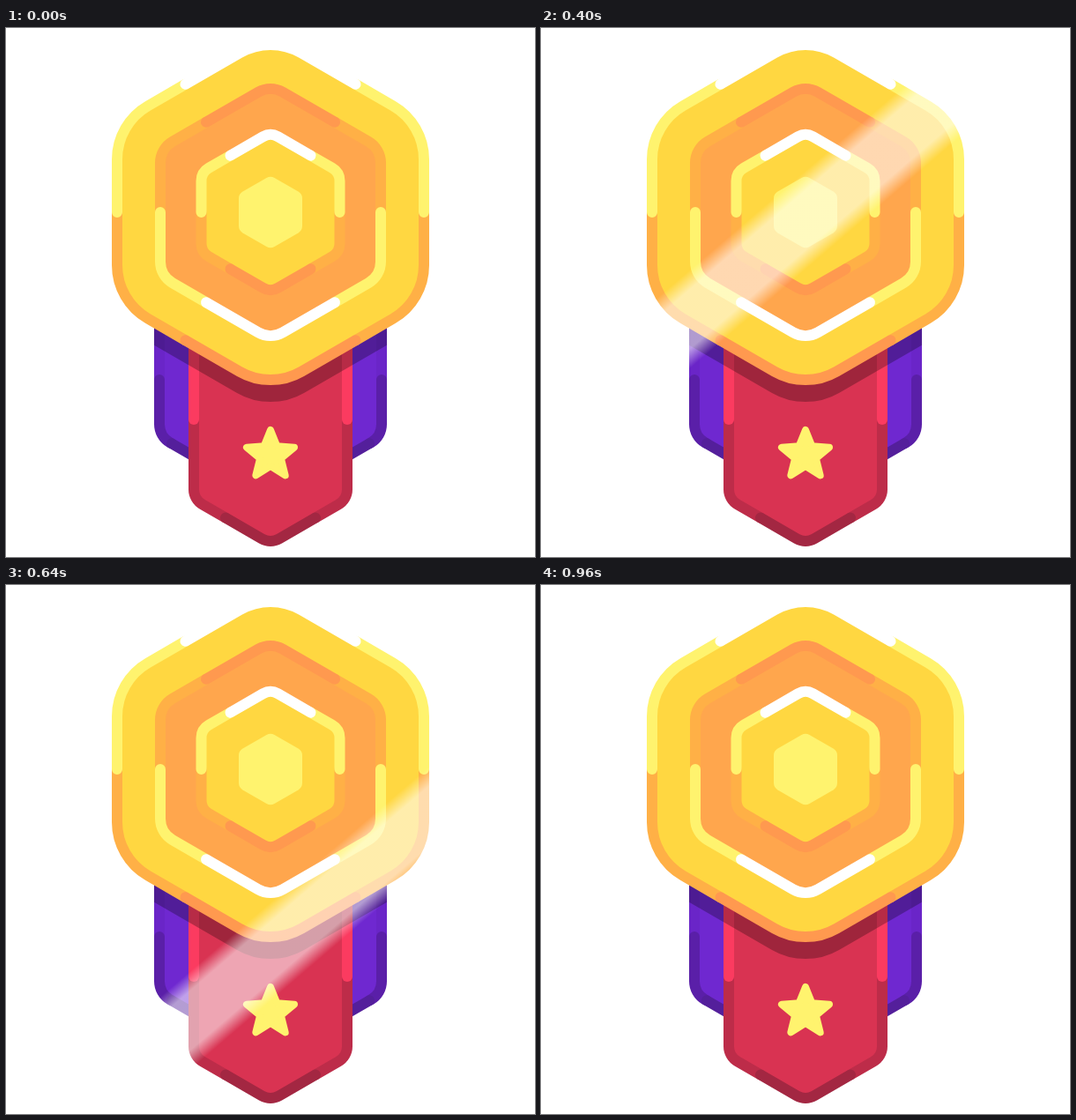
An HTML page with a canvas for the animation above (1.36 s loop, 600 by 600 pixels).

```html
<!DOCTYPE html>
<html>
<head>
<meta charset="utf-8">
<style>
html, body { margin: 0; width: 100%; height: 100%; overflow: hidden; background: #fff; }
canvas { display: block; }
</style>
</head>
<body>
<canvas id="stage" width="600" height="600"></canvas>
<script>
const ctx = document.getElementById('stage').getContext('2d');
const T = Math.tan(Math.PI / 6);
const CX = 300, CY = 209, LOOP = 1360, STEP = 40;
const GOLD = '#ffd741', LEMON = '#fff36e', AMBER = '#ffb046', ORANGE = '#ffa64d', RUST = '#ff994f';

// Open path through sharp points, with the inner ones rounded
function line(color, r, ...pts) {
  ctx.beginPath();
  ctx.moveTo(...pts[0]);
  for (let i = 1; i < pts.length - 1; i++) ctx.arcTo(...pts[i], ...pts[i + 1], r);
  ctx.lineTo(...pts[pts.length - 1]);
  ctx.strokeStyle = color;
  ctx.stroke();
}

function hexPath(a, r, cy = CY) {
  const h = a * T, R = 2 * h;
  const pts = [[a, -h], [a, h], [0, R], [-a, h], [-a, -h], [0, -R]].map(([x, y]) => [CX + x, cy + y]);
  ctx.beginPath();
  ctx.moveTo(CX + a, cy);
  for (let i = 1; i <= 6; i++) ctx.arcTo(...pts[i % 6], ...pts[(i + 1) % 6], r);
  ctx.closePath();
}

function fillHex(color, a, r, cy) {
  hexPath(a, r, cy);
  ctx.fillStyle = color;
  ctx.fill();
}

// Upper (s = -1) or lower (s = 1) half of a ring: two sides and a tip
function half(s, a, r, d, side, tip) {
  const R = 2 * a * T, y = CY + s * (R - d * T);
  for (const k of [-1, 1])
    line(side, r, [CX + k * a, CY], [CX + k * a, CY + s * R / 2], [CX + k * d, y]);
  line(tip, r, [CX - d, y], [CX, CY + s * R], [CX + d, y]);
}

function ribbonPath(w, tip, r) {
  const y = tip - w * T;
  ctx.moveTo(CX - w, 300);
  ctx.arcTo(CX - w, y, CX, tip, r);
  ctx.arcTo(CX, tip, CX + w, y, r);
  ctx.arcTo(CX + w, y, CX + w, 300, r);
  ctx.lineTo(CX + w, 300);
  ctx.closePath();
}

function ribbon(w, tip, r, d, split, lightOnTop, [body, light, dark, end]) {
  const y = tip - d * T;
  ctx.beginPath();
  ribbonPath(w, tip, r);
  ctx.fillStyle = body;
  ctx.fill();
  for (const k of [-1, 1]) {
    const x = CX + k * w;
    const upper = () => line(light, r, [x, 300], [x, split]);
    const lower = () => line(dark, r, [x, split], [x, tip - w * T], [CX + k * d, y]);
    if (lightOnTop) { lower(); upper(); } else { upper(); lower(); }
  }
  line(end, r, [CX - d, y], [CX, tip], [CX + d, y]);
}

function shadow() {
  ctx.save();
  ctx.beginPath();
  ribbonPath(132, 543, 30);
  ribbonPath(93, 592, 28);
  ctx.clip();
  fillHex('rgba(0,0,0,.27)', 180, 76, CY + 19);
  ctx.restore();
}

function star(cy) {
  ctx.beginPath();
  for (let i = 0; i < 10; i++) {
    const r = i % 2 ? 12.5 : 28.4, t = i * Math.PI / 5;
    ctx.lineTo(CX + r * Math.sin(t), cy - r * Math.cos(t));
  }
  ctx.closePath();
  ctx.lineWidth = 8;
  ctx.fillStyle = ctx.strokeStyle = LEMON;
  ctx.fill();
  ctx.stroke();
}

// Diagonal band of light; c = y + 0.857x is constant along its edges
function shine(t) {
  const n = 0.857, front = 201 + 0.825 * t, back = front - 112;
  const at = c => [n * c / (1 + n * n), c / (1 + n * n)];
  const g = ctx.createLinearGradient(...at(back), ...at(front));
  const stops = [[0, 0], [0.2, 0.56], [0.8, 0.56], [1, 0]];
  for (const [pos, alpha] of stops) g.addColorStop(pos, `rgba(255,255,255,${alpha})`);
  ctx.fillStyle = g;
  ctx.fillRect(0, 0, 600, 600);
}

function draw(t) {
  ctx.fillStyle = '#fff';
  ctx.fillRect(0, 0, 600, 600);
  ctx.lineCap = ctx.lineJoin = 'round';
  ctx.lineWidth = 12;

  ribbon(126, 536, 24, 112, 399, false, ['#6f28d0', '#6a25c8', '#5a1fa8', '#541f9b']);
  ribbon(87, 585, 20, 51, 444, true, ['#d93352', '#fb3b60', '#bd2c49', '#a32742']);
  shadow();

  fillHex(GOLD, 174, 70);
  half(1, 174, 70, 96.5, AMBER, RUST);
  half(-1, 174, 70, 96.5, LEMON, '#fff');

  fillHex(ORANGE, 125, 28);
  half(-1, 125, 28, 73, AMBER, RUST);
  half(1, 125, 28, 73, LEMON, '#fff');

  fillHex(GOLD, 78.5, 17);
  half(1, 78.5, 17, 45.5, AMBER, RUST);
  half(-1, 78.5, 17, 45.5, LEMON, '#fff');

  fillHex(LEMON, 36, 9);
  star(484.4);
  shine(t);
}

const start = performance.now();
function tick() {
  const t = (performance.now() - start) % LOOP;
  draw(Math.floor(t / STEP) * STEP);
  requestAnimationFrame(tick);
}
tick();
</script>
</body>
</html>
```
